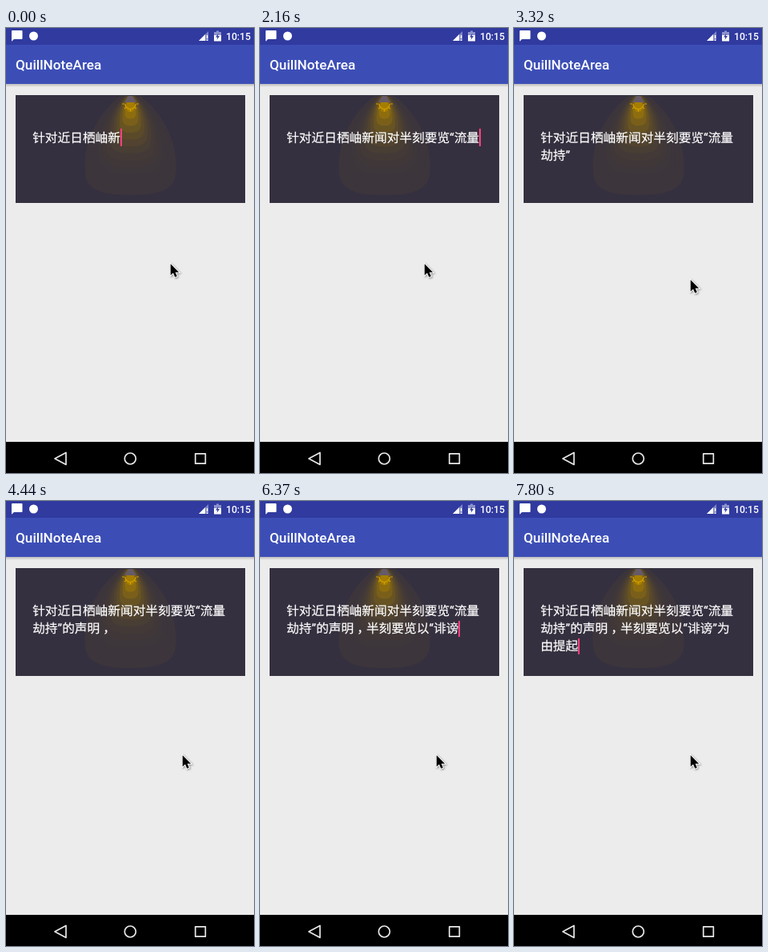
Recreate the animation shown at these times as an HTML page. Size 310 by 557 pixels, loop 8 s.

```html
<!DOCTYPE html>
<html lang="zh-CN">
<head>
<meta charset="utf-8">
<title>Typing demo</title>
<style>
  html, body { margin: 0; width: 100%; height: 100%; overflow: hidden; background: #ececec; }
  svg { position: absolute; left: 0; top: 0; }
  svg text { font-family: Roboto, sans-serif; font-weight: 500; fill: #fff; }
  #pointer { filter: drop-shadow(1px 1px 1px #0006); }
  #typed {
    position: absolute; left: 33.2px; top: 126.6px; margin: 0; color: #fff;
    font: 15.7px/22px Roboto, "Noto Sans CJK SC", "Noto Sans CJK", sans-serif;
    white-space: pre; text-rendering: geometricPrecision; -webkit-text-stroke: .2px #fff;
  }
  #typed i { position: relative; left: 4px; font-style: normal; }
  #typed b { display: inline-block; position: relative; width: 0; height: 0; }
  #typed b::after {
    content: ""; position: absolute; left: 0; top: -15px;
    width: 1.7px; height: 20px; background: #ff4081;
  }
  #typed b.first::after { top: -17px; height: 22px; }
</style>
</head>
<body>
<svg width="310" height="557" viewBox="0 0 310 557">
  <defs>
    <linearGradient id="shade" x2="0" y2="1">
      <stop stop-color="#bbb"/><stop offset="1" stop-color="#ececec"/>
    </linearGradient>
  </defs>
  <rect width="310" height="21" fill="#303a9f"/>
  <rect y="21" width="310" height="49" fill="#3c4eb6"/>
  <rect y="70" width="310" height="4" fill="url(#shade)"/>
  <text x="12" y="52" font-size="17.2">QuillNoteArea</text>

  <!-- status icons -->
  <path d="M8 3H19.5Q20.5 3 20.5 4V13Q20.5 14 19.5 14H10L7 16.7V4Q7 3 8 3Z" fill="#fff"/>
  <circle cx="34.5" cy="10" r="5.5" fill="#fff"/>
  <path d="M253 4V16H241Z" fill="#7f86c6"/>
  <path d="M249 8V16H241Z" fill="#fff"/>
  <path d="M251.5 9V13M251.5 14.5V16" stroke="#fff" stroke-width="1.4"/>
  <path d="M260 5H263V3.5H266V5H269V9H260Z" fill="#8c92cc"/>
  <path d="M260 9H269V16.5H260Z" fill="#fff"/>
  <path d="M265.5 6.5L262 11.5H264.3L263.5 15L267 10H264.7Z" fill="#303a9f"/>
  <text x="275" y="15" font-size="12.2">10:15</text>

  <!-- lamp card -->
  <rect x="12" y="84" width="287" height="135" fill="#35303f"/>
  <g id="glow"></g>
  <path d="M153 85H158L163 93H148Z" fill="#655a68"/>
  <path d="M149 95A6.5 6.5 0 0 0 162 95M145 95H148M163 95H166M148 101L150 99.5M163 101L161 99.5M155.5 102V104.5"
        fill="none" stroke="#d69f00" stroke-width="1.2"/>

  <!-- navigation bar -->
  <rect y="518" width="310" height="39" fill="#000"/>
  <g fill="none" stroke="#e8e8e8" stroke-width="1.7" stroke-linejoin="round">
    <path d="M61 539L75 531.5V546.5Z"/>
    <circle cx="155.3" cy="539" r="7"/>
    <rect x="236.7" y="532.8" width="12.6" height="12.4"/>
  </g>
  <path id="pointer" d="M0 0V14.3L3.3 11.3L5.5 16.5L8.1 15.4L5.9 10.4H10.4Z" stroke="#fff" stroke-width="2" paint-order="stroke"/>
</svg>
<p id="typed"></p>

<script>
const LOOP = 8000;
const PREFIX = '针对近日栖岫新';
// Each burst of typing ends at a punctuation mark; the caret hides during the pause.
const bursts = [
  { text: '闻对半刻要览“', start: 150, step: 200, hide: 1870 },
  { text: '流量\n劫持”', start: 1950, step: 205, hide: 3270 },
  { text: '的声明，', start: 3350, step: 193, hide: 4440 },
  { text: '半刻要览以“', start: 4560, step: 202, hide: 6050 },
  { text: '诽谤”', start: 6165, step: 205, hide: 7060 },
  { text: '为\n由提起', start: 7180, step: 206, hide: LOOP }
];
// time, x, y of the mouse pointer
const pointerPath = [
  [2590, 205.7, 295.3], [2770, 214.7, 307.3], [2880, 219.5, 330],
  [3170, 219.5, 330], [3320, 220.7, 315.3], [3440, 220.7, 318.3]
];
const typed = document.getElementById('typed');
const pointer = document.getElementById('pointer');

function drawGlow() {
  const layers = 13, cx = 155.5, top = 85;
  const mix = (a, b, k) => Math.round(a + (b - a) * k);
  let paths = '';
  for (let i = 0; i < layers; i++) {
    const t = i / (layers - 1), k = 0.06 + 0.94 * t ** 3;
    const w = 53 * (1 - t) ** 1.3 + 5, h = 124 - 104 * t;
    const p = (x, y) => `${(cx + w * x).toFixed(1)} ${(top + h * y).toFixed(1)} `;
    const d = 'M' + p(-.22, 0) + 'C' + p(-.75, .2) + p(-1.05, .5) + p(-.97, .8) +
      'C' + p(-.92, .97) + p(-.5, 1) + p(0, 1) +
      'C' + p(.5, 1) + p(.92, .97) + p(.97, .8) +
      'C' + p(1.05, .5) + p(.75, .2) + p(.22, 0) + 'Z';
    paths += `<path d="${d}" fill="rgb(${mix(53, 165, k)},${mix(48, 126, k)},${mix(63, 0, k)})"/>`;
  }
  document.getElementById('glow').innerHTML = paths;
}

function typedMarkup(time) {
  let text = PREFIX, caret = true;
  for (const { text: part, start, step, hide } of bursts) {
    if (time < start) break;
    const count = Math.floor((time - start) / step) + 1;
    // A line break appears together with the character after it.
    const newline = part.indexOf('\n');
    text += part.slice(0, newline >= 0 && count > newline ? count + 1 : count);
    caret = time < hide;
  }
  const mark = caret ? `<b class="${text.includes('\n') ? '' : 'first'}"></b>` : '';
  return text.replace('，', '<i>，</i>') + mark;
}

function pointerAt(time) {
  const next = pointerPath.findIndex(key => key[0] > time);
  if (next === 0) return pointerPath[0].slice(1);
  if (next < 0) return pointerPath[pointerPath.length - 1].slice(1);
  const [t0, x0, y0] = pointerPath[next - 1], [t1, x1, y1] = pointerPath[next];
  const k = (time - t0) / (t1 - t0);
  return [x0 + (x1 - x0) * k, y0 + (y1 - y0) * k];
}

let shown = '';
function render() {
  const time = performance.now() % LOOP;
  const markup = typedMarkup(time);
  if (markup !== shown) typed.innerHTML = shown = markup;
  pointer.setAttribute('transform', `translate(${pointerAt(time)})`);
  requestAnimationFrame(render);
}

drawGlow();
render();
</script>
</body>
</html>
```
